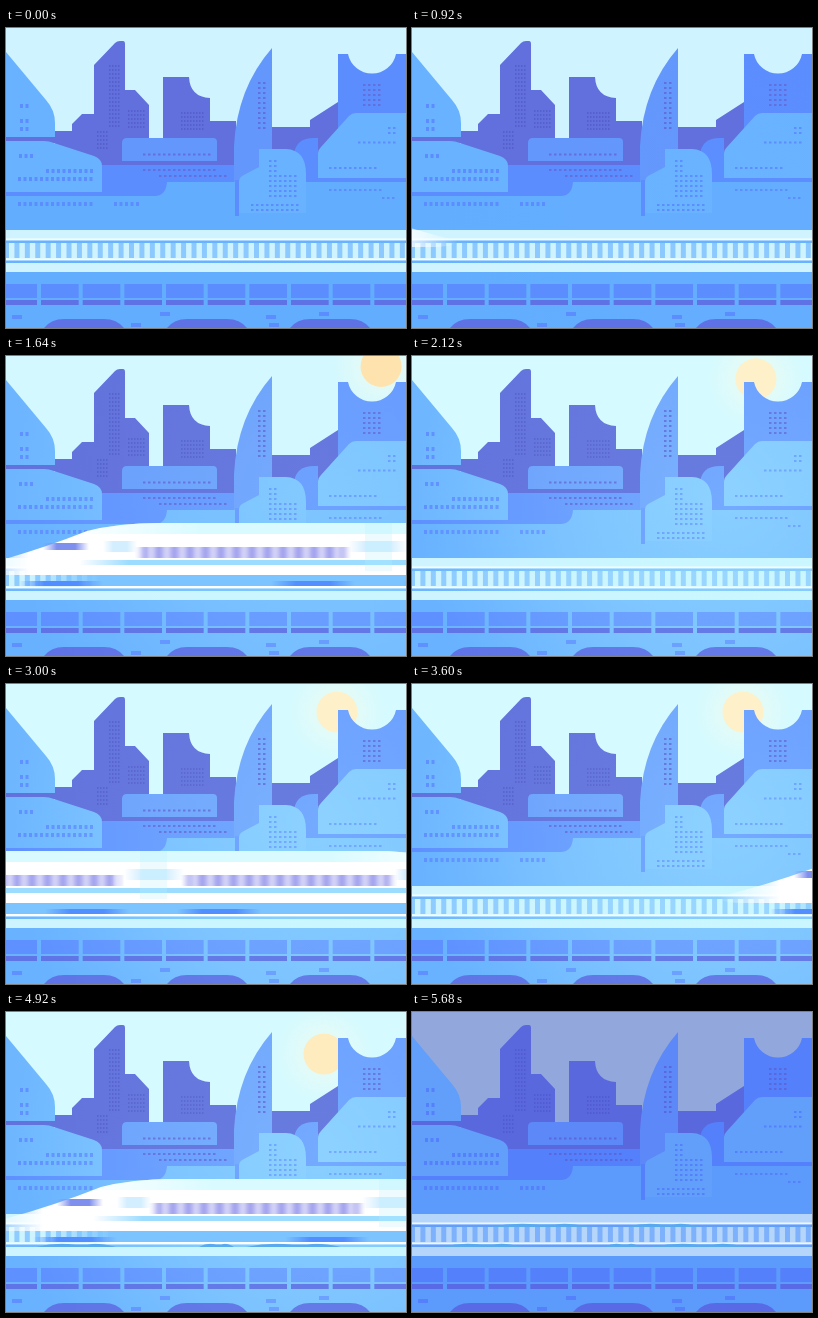
An HTML page with a canvas that plays this animation: 400x300 px, repeating every 5720 ms.

```html
<!DOCTYPE html>
<html lang="en">
<head>
<meta charset="utf-8">
<title>City and train</title>
<style>
html, body { margin: 0; width: 100%; height: 100%; overflow: hidden; background: #cff4ff; }
canvas { display: block; width: 400px; height: 300px; }
</style>
</head>
<body>
<canvas id="stage" width="400" height="300"></canvas>
<script>
const ctx = document.getElementById('stage').getContext('2d');
const LOOP = 5720, SPEED = 1.405;
const CAR = 273, WINDOWS = 217, FIRST_WINDOW = 155, LENGTH = 1072, HALF = LENGTH / 2;
const TAIL_AT_ZERO = [1659, 3374, 4929];
const SUNLIGHT = [190, 255, 255], NIGHT = [60, 70, 230];

const clamp = v => Math.max(0, Math.min(1, v));
const ramp = (t, from, to) => clamp((t - from) / (to - from));
const blend = (a, b, k) => a.map((v, i) => Math.round(v + (b[i] - v) * k));
const rgb = c => `rgb(${c})`;

function rect(color, x, y, w, h) {
  ctx.fillStyle = color;
  ctx.fillRect(x, y, w, h);
}

function shape(color, d) {
  ctx.fillStyle = color;
  ctx.fill(new Path2D(d));
}

// A city colour: tinted at dusk, brightened towards the sunny side by day.
function paint(base, glow, day, dusk) {
  const color = blend(base, NIGHT, 0.18 * dusk);
  const g = ctx.createRadialGradient(315, 140, 0, 315, 140, 310);
  [1, 0.7, 0.14].forEach((k, i) => g.addColorStop(i / 2, rgb(blend(color, SUNLIGHT, glow * day * k))));
  return g;
}

function palette(day, dusk) {
  const tone = (base, glow) => paint(base, glow, day, dusk);
  return {
    pale: tone([207, 244, 255], 0.3),
    bar: tone([140, 201, 255], 0.3),
    light: tone([105, 178, 255], 0.42),
    ground: tone([99, 173, 255], 0.42),
    pill: tone([99, 151, 252], 0.25),
    blue: tone([91, 141, 255], 0.25),
    arch: tone([94, 114, 230], 0.08),
    purple: tone([97, 112, 220], 0.08),
    speck: tone([85, 96, 205], 0.08)
  };
}

// Window styles: column pitch, row pitch, width, height.
const SPECK = [3, 4, 1.5, 2], DOT = [5, 5, 2.5, 2], PANE = [5.5, 8, 3, 4];

function windows([dx, dy, w, h], color, x, y, cols, rows = 1) {
  for (let r = 0; r < rows; r++)
    for (let c = 0; c < cols; c++) rect(color, x + c * dx, y + r * dy, w, h);
}

function drawSun(t) {
  const away = 137 * (1 - ramp(t, 900, 2800)) ** 2.3;
  const fall = Math.max(0, (t - 4400) / 520) ** 2;
  const x = 331 + away - 13 * fall, y = 28 - 0.4 * away + 14 * fall;
  const warm = 1 - ramp(t, 1200, 2100) + 0.2 * ramp(t, 4400, 4920);
  ctx.globalAlpha = ramp(t, 900, 1100) * (1 - ramp(t, 5100, 5600));
  const glow = ctx.createRadialGradient(x, y, 18, x, y, 48);
  glow.addColorStop(0, 'rgba(240,252,240,.55)');
  glow.addColorStop(1, 'rgba(240,252,240,0)');
  rect(glow, x - 50, y - 50, 100, 100);
  ctx.fillStyle = rgb(blend([254, 240, 200], [255, 215, 150], warm));
  ctx.beginPath();
  ctx.arc(x, y, 20.5, 0, 2 * Math.PI);
  ctx.fill();
  ctx.globalAlpha = 1;
}

function drawFarCity(c) {
  shape(c.purple, 'M49 140V103H66V96L76 86H88V37L109 15Q111 13 114 13H117Q119 13 119 16V62H129L143 77V110H157V49H183Q184 69 204 70V93H230V99H304V92L332 74V150H49Z');
  windows(SPECK, c.speck, 103, 37, 4, 16);
  windows(SPECK, c.speck, 91, 103, 4, 5);
  windows(SPECK, c.speck, 122, 82, 6, 5);
  windows(SPECK, c.speck, 175, 84, 8, 5);

  rect(c.blue, 96, 137, 133, 31);
  shape(c.pill, 'M121 110H207Q211 110 211 114V133H116V115Q116 110 121 110Z');
  windows(DOT, c.purple, 137, 125.5, 14);
  windows(DOT, c.purple, 137, 141, 15);
  windows(DOT, c.purple, 153, 147, 14);

  shape(c.blue, 'M288 150V126Q290 110 308 110H312V150Z');
  shape(c.pill, 'M228 160V118Q231 60 266 20V160Z');
  windows(DOT, c.purple, 252, 54, 2, 10);
  shape(c.blue, 'M332 150V26H342A24.5 24.5 0 0 0 390 26H400V150Z');
  windows(DOT, c.purple, 357, 56, 4, 5);
}

function drawNearCity(c) {
  rect(c.purple, 0, 106, 49, 9);
  shape(c.light, 'M0 24L40 72Q49 82 49 95V109H0Z');
  shape(c.light, 'M0 113H38Q43 113 48 115L88 128Q96 131 96 138V164H0Z');
  rect(c.blue, 0, 164, 150, 4);
  shape(c.ground, 'M0 168H150Q160 167 161 154H400V202H0Z');
  rect(c.blue, 229, 152, 4, 36);
  shape(c.light, 'M233 185V153Q233 150 236 148L253 139V121H280Q300 122 300 146V185Z');
  shape(c.light, 'M312 150V125Q312 122 315 119L343 88Q346 85 350 85H400V150Z');
  rect(c.blue, 300, 150, 100, 4);

  windows(PANE, c.blue, 14, 76, 2);
  windows(PANE, c.blue, 14, 91, 2, 2);
  windows(PANE, c.blue, 13, 126, 3);
  windows(PANE, c.blue, 40, 141, 9);
  windows(PANE, c.blue, 12, 149, 14);
  windows(PANE, c.blue, 12, 174, 14);
  windows(PANE, c.blue, 108, 174, 5);
  windows(DOT, c.blue, 263, 132, 2, 3);
  windows(DOT, c.blue, 263, 147, 6, 5);
  windows(DOT, c.blue, 245, 176, 10, 2);
  windows(DOT, c.blue, 382, 99, 2, 2);
  windows(DOT, c.blue, 352, 113.5, 8);
  windows(DOT, c.blue, 323, 139, 10);
  windows(DOT, c.blue, 323, 161, 11);
  windows(DOT, c.blue, 376, 169, 3);
}

function drawBridge(c) {
  rect(c.pale, 0, 202, 400, 42);
  for (let x = -2; x < 400; x += 125 / 12) rect(c.bar, x, 215, 5, 15);
  for (const y of [210.5, 230.5]) {
    rect('rgba(255,255,255,.8)', 0, y, 400, 2);
    rect(c.light, 0, y + 2, 400, 2.5);
  }
  rect(c.ground, 0, 244, 400, 56);
  rect(c.blue, 0, 256, 400, 14);
  rect(c.arch, 0, 272, 400, 5);
  for (let x = 31; x < 400; x += 125 / 3) rect(c.ground, x, 256, 4, 21);
  for (let i = 0; i < 2; i++) {
    rect(c.blue, 6 + 254 * i, 287, 10, 4);
    rect(c.blue, 125 + 138 * i, 295, 10, 4);
    rect(c.blue, 154 + 159 * i, 284, 10, 4);
  }
  for (let x = 38; x < 400; x += 123)
    shape(c.arch, `M${x} 300q7 -9 20 -9h40q13 0 20 9z`);
}

// Horizontal gradient from clear to solid, and back again when `out` is given.
function fade(color, from, to, out) {
  const g = ctx.createLinearGradient(from, 0, out || to, 0);
  const solid = out ? (to - from) / (out - from) : 1;
  g.addColorStop(0, color + '00');
  g.addColorStop(solid, color);
  if (out) {
    g.addColorStop(1 - solid, color);
    g.addColorStop(1, color + '00');
  }
  return g;
}

const softBar = (color, x, y, w, h) => rect(fade(color, x, x + w * 0.3, x + w), x, y, w, h);

function drawHalfTrain() {
  rect(fade('#7cc4ff', 50, 120), 50, 219, HALF - 50, 12);
  rect(fade('#ffffff', 30, 120), 30, 230, HALF - 30, 1.5);
  shape(fade('#ffffff', -12, 50), `M-12 213Q50 198 108 175Q140 167 180 167H${HALF}V219H10Q-10 218 -12 213Z`);
  shape(fade('#d9fbff', 90, 220), `M108 175Q140 167 180 167H${HALF}V178H100Z`);
  rect(fade('#9bdcff', 100, 150), 100, 204, HALF - 100, 5);
  softBar('#7f8fee', 64, 187, 46, 7);
  softBar('#d3eeff', 124, 185, 34, 11);

  for (let start = FIRST_WINDOW; start < HALF; start += CAR) {
    const end = start + WINDOWS;
    for (let x = start; x < Math.min(end, HALF); x++) {
      const edge = clamp(Math.min(x - start, end - x) / 12);
      const wave = Math.cos((x - HALF) * 2 * Math.PI / 15.5);
      rect(`rgba(125,125,232,${edge * (0.52 + 0.16 * wave)})`, x, 191, 1, 11);
    }
  }
  const joint = FIRST_WINDOW + WINDOWS;
  softBar('#d3eeff', joint - 3, 185, 60, 11);
  rect('rgba(185,238,255,.25)', joint + 14, 167, 27, 48);
  for (const x of [82, joint - 38, joint + 94]) softBar('#528eff', x - 42, 225, 84, 5);
}

function drawTrain(tail) {
  if (tail > 420 || tail + LENGTH < -20) return;
  ctx.save();
  ctx.translate(Math.round(tail), 0);
  drawHalfTrain();
  ctx.translate(LENGTH, 0);
  ctx.scale(-1, 1);
  drawHalfTrain();
  ctx.restore();
}

function drawTrackShadows(t) {
  const mound = (x, y, w) =>
    shape('#59a9ef', `M${x} ${y}q${w * 0.2} -4 ${w * 0.4} -3t${w * 0.3} 0t${w * 0.3} 3z`);
  ctx.globalAlpha = ramp(t, 4860, 4920);
  mound(78, 215, 100);
  mound(215, 215, 72);
  mound(30, 235, 80);
  mound(193, 235, 35);
  mound(240, 235, 95);
  ctx.globalAlpha = 1;
}

function draw(t) {
  const dusk = ramp(t, 5000, 5680), day = ramp(t, 900, 1900) * (1 - dusk);
  const sky = blend([207, 244, 255], [213, 250, 255], day);
  const colors = palette(day, dusk);
  rect(rgb(blend(sky, [146, 168, 220], dusk)), 0, 0, 400, 300);
  drawSun(t);
  drawFarCity(colors);
  drawNearCity(colors);
  drawBridge(colors);
  drawTrackShadows(t);
  for (const zero of TAIL_AT_ZERO) drawTrain((t - zero) * SPEED);
}

const begin = performance.now();
function frame() {
  const t = (performance.now() - begin) % LOOP;
  draw(Math.floor(t / 40) * 40);
  requestAnimationFrame(frame);
}
frame();
</script>
</body>
</html>
```
